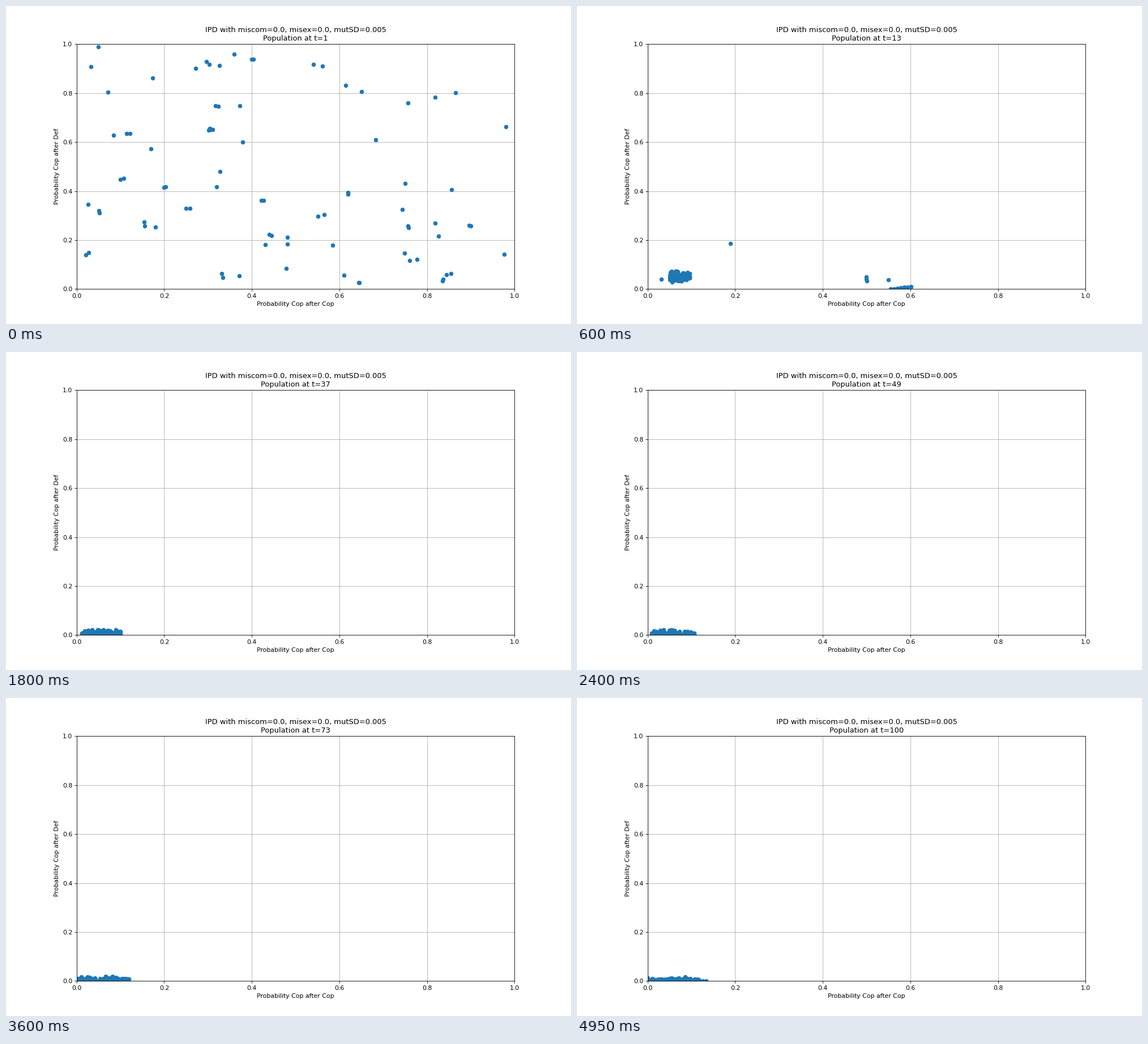
Write a matplotlib script that moves like this. It is 998x561 px and loops after 5.05 s.

```python
import numpy as np
import matplotlib.pyplot as plt
from matplotlib.animation import FuncAnimation

T_END = 100
DPI = 78
SIZE = 110
rng = np.random.default_rng(5)

# Extent of the main cluster at a few generations
KEYS = [1, 13, 37, 100]
LOW = [.078, .051, .012, -.005]
HIGH = [.086, .096, .100, .136]
MEAN_Y = [.061, .050, .005, .001]
DEV_Y = [.003, .010, .008, .007]

# Minor strategies at generation 13: two ends of a row, size, last generation
CLANS = [
    ((.187, .182), (.189, .186), 2, 17),
    ((.499, .050), (.501, .032), 3, 21),
    ((.550, .037), (.550, .037), 1, 20),
    ((.555, .000), (.601, .010), 7, 33),
    ((.031, .041), (.031, .041), 1, 25),
]


def first_generation(founders=62):
    """Scattered founders, some with a few slightly mutated relatives."""
    points = .97 * rng.uniform(.02, 1, (founders, 2)) ** 1.3 + .02
    families = np.repeat(points, rng.poisson(.5, founders), axis=0)
    return np.vstack([points, families + rng.normal(0, .006, families.shape)])


def wander(keep):
    """Stationary noise per generation; keep is the share carried over."""
    z = rng.normal(size=(T_END + 1, SIZE))
    for t in range(1, T_END + 1):
        z[t] = keep * z[t - 1] + np.sqrt(1 - keep ** 2) * z[t]
    return z


def drift(n, sd, start):
    path = np.cumsum(rng.normal(0, sd, (T_END + 1, n, 2)), axis=0)
    return path - path[start]


first = first_generation()
first_drift = drift(len(first), .004, 1)
first_end = 1 - 4.5 * np.log(first[:, 1]) * rng.uniform(.6, 1.2, len(first))
copies = rng.normal(0, .007, (T_END + 1, *first.shape))

clans = np.vstack([np.linspace(a, b, n) for a, b, n, _ in CLANS])
clan_end = np.concatenate([np.linspace(last, last - 6, n)[::-1]
                           for *_, n, last in CLANS])
clan_drift = drift(len(clans), .001, 13)

body_x = wander(.95)
body_y = wander(.6).clip(-2.2, 2.2)


def early(t):
    if t == 1:
        return first
    alive = first_end >= t
    points = (first + first_drift[t])[alive]
    return np.vstack([points, points + copies[t][alive]])


def minor(t):
    points = clans + clan_drift[t]
    points[:, 0] *= 1 + .0016 * (t - 13)
    return points[clan_end >= t]


def body(t):
    low, high, mean, dev = (np.interp(t, KEYS, k)
                            for k in (LOW, HIGH, MEAN_Y, DEV_Y))
    x = (low + high) / 2 + (high - low) / 2 * np.sin(.75 * body_x[t])
    y = mean + dev * body_y[t]
    count = min(SIZE, SIZE * (t - 1) // 8)
    return np.column_stack([x, y])[:count]


def population(t):
    groups = [body(t)]
    if t <= 12:
        groups.append(early(t))
    if t >= 5:
        groups.append(minor(t))
    return np.vstack(groups).clip(0, 1)


fig, ax = plt.subplots(figsize=(998 / DPI, 561 / DPI), dpi=DPI)
ax.set(xlim=(0, 1), ylim=(0, 1), xlabel="Probability Cop after Cop",
       ylabel="Probability Cop after Def")
ax.grid(True)
dots, = ax.plot([], [], "o", color="C0")
title = ax.set_title("")


def draw(i):
    t = min(i + 1, T_END)
    dots.set_data(*population(t).T)
    title.set_text("IPD with miscom=0.0, misex=0.0, mutSD=0.005\n"
                   f"Population at t={t}")
    return dots, title


# The last generation holds for one extra tick
anim = FuncAnimation(fig, draw, frames=T_END + 1, interval=50, repeat=True)
plt.show()
```
